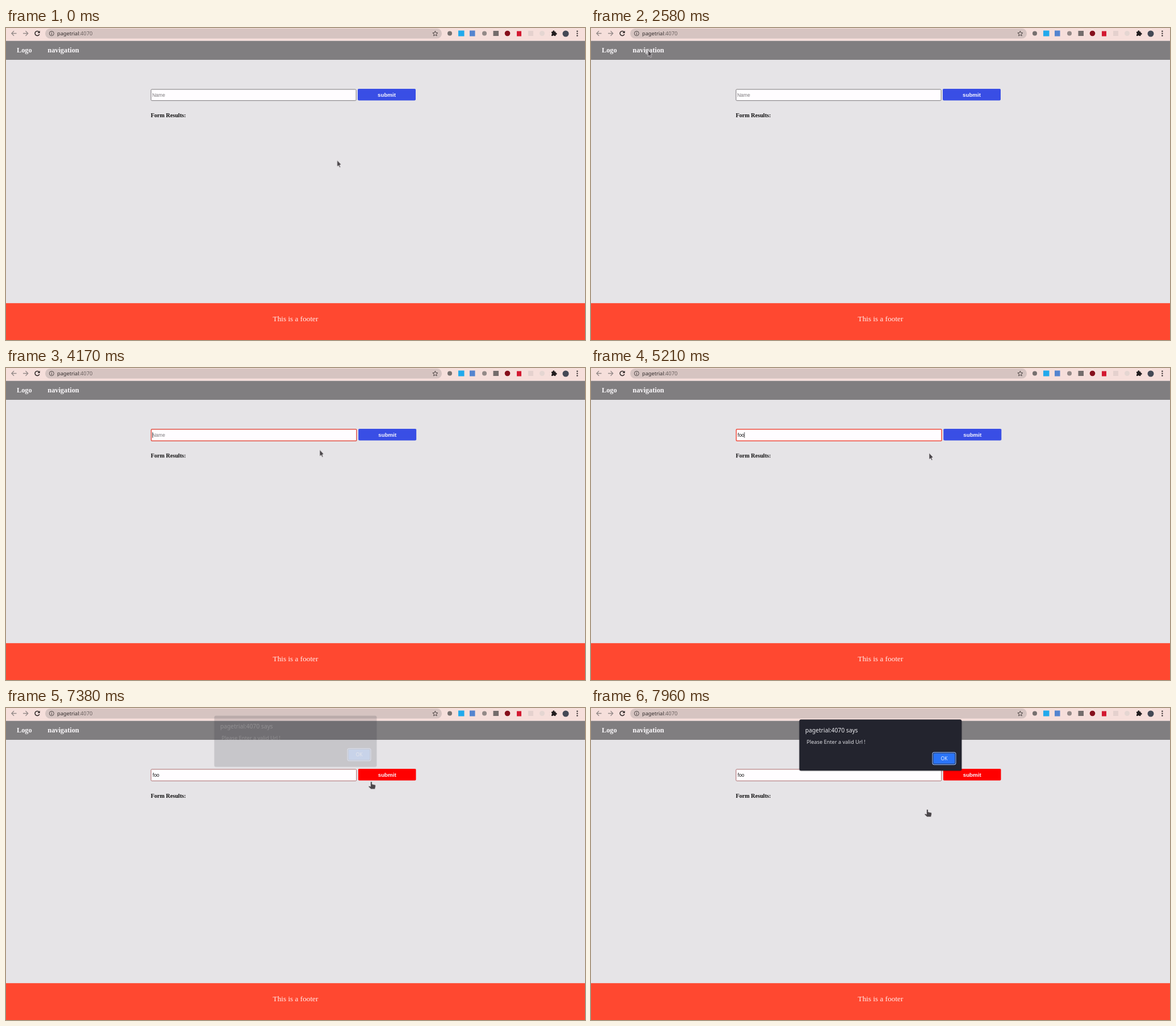
Animation of 1019x549 px, one loop 8 s. Source, as an HTML page:

```html
<!DOCTYPE html>
<html lang="en">
<head>
<meta charset="utf-8">
<title>Form validation</title>
<style>
html, body { margin: 0; width: 100%; height: 100%; overflow: hidden; background: #e6e4e7; }
svg { display: block; width: 100%; height: 100%; }
.serif { font-family: "Liberation Serif", Times, serif; }
.sans { font-family: "Liberation Sans", Arial, sans-serif; }
.ui { font-family: "Noto Sans", sans-serif; }
.bold { font-weight: 700; }
.line { fill: none; stroke: #4d4545; stroke-width: 1.3; }
.mid { text-anchor: middle; }

/* One loop is 8 s, so 1% is 80 ms. */
.field, .button, .fill, .results, .dialog, .cursor { animation: 8s linear infinite; }
.hint, .k1, .k2, .k3, .caret, .arrow, .beam, .hand { animation: 8s step-end infinite; }

.field { fill: #fffdff; animation-name: field; }
@keyframes field {
  0%, 49.5% { x: 255.2px; y: 108px; width: 361px; height: 19.7px; stroke: #7b787b; stroke-width: 1px; }
  52.5%, 90% { x: 255.6px; y: 107.8px; width: 361.5px; height: 20.5px; stroke: #ee4a3c; stroke-width: 1.5px; }
  90.9%, 100% { x: 255.2px; y: 107.9px; width: 361.6px; height: 20.3px; stroke: #a9686a; stroke-width: 1px; }
}
.button { animation-name: button; }
@keyframes button {
  0%, 49.5% { transform: translateX(0); }
  52.5%, 90% { transform: translateX(1.3px); }
  90.9%, 100% { transform: translateX(.7px); }
}
.fill { animation-name: fill; }
@keyframes fill {
  0%, 85.5% { fill: #394ee5; }
  86.5% { fill: #4548d0; }
  90.2%, 100% { fill: #f00; }
}
.results { animation-name: results; }
@keyframes results {
  0%, 49.5% { transform: translateY(0); }
  52.5%, 100% { transform: translateY(.6px); }
}

.hint { animation-name: hint; }
@keyframes hint { 0% { visibility: visible; } 61.5% { visibility: hidden; } }
.k1 { animation-name: k1; }
.k2 { animation-name: k2; }
.k3 { animation-name: k3; }
@keyframes k1 { 0% { visibility: hidden; } 61.5% { visibility: visible; } }
@keyframes k2 { 0% { visibility: hidden; } 63.5% { visibility: visible; } }
@keyframes k3 { 0% { visibility: hidden; } 65.12% { visibility: visible; } }
.caret { animation-name: caret; }
@keyframes caret {
  0% { opacity: 0; transform: none; }
  50.6% { opacity: 1; transform: none; }
  57.25% { opacity: 0; transform: none; }
  61.5% { opacity: 1; transform: translateX(2.5px); }
  63.5% { opacity: 1; transform: translateX(7.2px); }
  65.12% { opacity: 1; transform: translateX(11.8px); }
  77.62% { opacity: 0; transform: translateX(11.8px); }
  83.9% { opacity: 1; transform: translateX(11.8px); }
  90.12% { opacity: 0; transform: none; }
}

.dialog { animation-name: dialog; }
@keyframes dialog {
  0%, 91.6% { opacity: 0; transform: translateY(-7.5px); }
  92.25% { opacity: .15; transform: translateY(-6.8px); }
  94.5%, 100% { opacity: 1; transform: none; }
}

.cursor { animation-name: cursor; }
@keyframes cursor {
  0% { transform: translate(583px, 232px); }
  .5% { transform: translate(570px, 233px); }
  2.1%, 4.5% { transform: translate(390px, 234px); }
  6% { transform: translate(350px, 216px); }
  9% { transform: translate(215px, 132px); }
  12% { transform: translate(95px, 60px); }
  14.6% { transform: translate(54px, 51px); }
  16.6%, 19% { transform: translate(35px, 51px); }
  22.4%, 24.2% { transform: translate(41px, 46px); }
  26.5% { transform: translate(30px, 36px); }
  29.5% { transform: translate(85px, 34px); }
  31.5% { transform: translate(120px, 39px); }
  34.4% { transform: translate(45px, 36px); }
  35.5% { transform: translate(24px, 35px); }
  38% { transform: translate(105px, 68px); }
  41% { transform: translate(245px, 125px); }
  43.25%, 45.2% { transform: translate(298px, 143px); }
  47.4%, 49.5% { transform: translate(307px, 111px); }
  52.6%, 80.2% { transform: translate(595px, 149px); }
  83% { transform: translate(615px, 141px); }
  86.5% { transform: translate(641px, 121px); }
  90% { transform: translate(642px, 122px); }
  92.25% { transform: translate(643px, 129px); }
  95.5% { transform: translate(622px, 157px); }
  99.4%, 100% { transform: translate(592px, 178px); }
}
.pointer { fill: #4b474b; stroke: #f2f0f2; stroke-width: .7; stroke-linejoin: round; }
.arrow { animation-name: arrow; }
.beam { animation-name: beam; }
.hand { animation-name: hand; }
@keyframes arrow {
  0% { visibility: visible; }
  46.8% { visibility: hidden; }
  50.5% { visibility: visible; }
  85.3% { visibility: hidden; }
}
@keyframes beam {
  0% { visibility: hidden; }
  46.8% { visibility: visible; }
  50.5% { visibility: hidden; }
}
@keyframes hand { 0% { visibility: hidden; } 85.3% { visibility: visible; } }
</style>
</head>
<body>
<svg viewBox="0 0 1019 549" preserveAspectRatio="none">
  <rect width="1019" height="549" fill="#e6e4e7"/>

  <!-- Browser bar -->
  <rect width="1019" height="22.7" fill="#f6dfdb"/>
  <rect x="69" y="1" width="698" height="17.5" rx="8.7" fill="#d6c4c1"/>
  <path class="line" style="stroke:#948a89" d="M18.5 9.5H10M14 5.3L9.8 9.5L14 13.7M30 9.5H38.5M34.500 5.300L38.700 9.500L34.500 13.700"/>
  <path class="line" style="stroke:#2c2626;stroke-width:1.5" d="M58.200 7A4 4 0 1 0 58.800 10.800"/>
  <path d="M59.600 4.800V9H55.400Z" fill="#2c2626"/>
  <circle class="line" cx="80.300" cy="9.600" r="4" style="stroke-width:1"/>
  <path class="line" style="stroke-width:1.100" d="M80.300 9V12M80.300 7V8.100"/>
  <text class="ui" x="90" y="13" font-size="9.200" fill="#332d2d">pagetrial<tspan fill="#6c6261">:4070</tspan></text>
  <path class="line" style="stroke-width:1" d="M755.400 5.300L756.700 8.300L759.900 8.600L757.500 10.700L758.200 13.800L755.400 12.200L752.600 13.800L753.300 10.700L750.900 8.600L754.100 8.300Z"/>
  <circle cx="781" cy="9.500" r="4" fill="#77706f"/>
  <rect x="796" y="4.500" width="10.500" height="10" fill="#22a9ec"/>
  <rect x="816" y="4.500" width="9.500" height="10" fill="#5484cf"/>
  <circle cx="842" cy="9.500" r="4" fill="#938987"/>
  <rect x="857.500" y="5" width="9.500" height="9" fill="#746d6c"/>
  <circle cx="882.500" cy="9.500" r="4.800" fill="#86101b"/>
  <rect x="899" y="5.500" width="8" height="9" fill="#d31931"/>
  <rect x="919" y="5" width="9" height="9" fill="#e5d1ce"/>
  <circle cx="943.500" cy="9.500" r="4.500" fill="#e5d6d2"/>
  <path fill="#211d1e" d="M960 6.500H962.300A1.600 1.600 0 1 1 965.300 6.500H967.500V8.700A1.600 1.600 0 1 1 967.500 11.700V14H965A1.500 1.500 0 0 0 962.200 14H960V11.600A1.500 1.500 0 0 0 960 8.800Z"/>
  <circle cx="985" cy="10" r="5.500" fill="#444955"/>
  <g fill="#373031">
    <circle cx="1005.400" cy="5.700" r="1.200"/>
    <circle cx="1005.400" cy="9.600" r="1.200"/>
    <circle cx="1005.400" cy="13.500" r="1.200"/>
  </g>

  <!-- Page -->
  <rect y="22.700" width="1019" height="33.300" fill="#807e80"/>
  <g class="serif bold" font-size="12.300" fill="#fbf9fb">
    <text x="19" y="43.300">Logo</text>
    <text x="73.300" y="43.300">navigation</text>
  </g>
  <rect y="484.200" width="1019" height="65" fill="#ff4830"/>
  <text class="serif mid" x="509.500" y="516.300" font-size="13.250" fill="#fff0ee">This is a footer</text>

  <rect class="field" rx="1.500"/>
  <g class="sans" font-size="8.500">
    <text class="hint" x="257.200" y="121" fill="#7b787b">Name</text>
    <text x="258" y="121" fill="#111"><tspan class="k1">f</tspan><tspan class="k2">o</tspan><tspan class="k3">o</tspan></text>
  </g>
  <rect class="caret" x="257.700" y="113" width=".8" height="10" fill="#111"/>
  <g class="button">
    <rect class="fill" x="619" y="107" width="102" height="20.400" rx="1.800"/>
    <text class="sans bold mid" x="670" y="121" font-size="9.750" fill="#f8f7ff">submit</text>
  </g>
  <text class="serif bold results" x="254.700" y="157.400" font-size="10.200" fill="#0d0c0d">Form Results:</text>

  <!-- Alert -->
  <g class="dialog ui">
    <rect x="365.800" y="20.500" width="287.400" height="91" rx="4" fill="#000" opacity=".18"/>
    <rect x="366.700" y="20.200" width="285.600" height="90" rx="3" fill="#23242e"/>
    <text x="377" y="43" font-size="10.250" fill="#eeeef2">pagetrial:4070 says</text>
    <text x="379.500" y="63" font-size="9.180" fill="#e0e0e5">Please Enter a valid Url !</text>
    <rect x="601" y="78.200" width="41" height="21.400" rx="3" fill="#23242e" stroke="#83acf4" stroke-width="1.200"/>
    <rect x="602.500" y="79.600" width="38" height="18.600" rx="2" fill="#2a74f8"/>
    <text class="mid" x="621.600" y="92" font-size="8.300" fill="#e9f0ff">OK</text>
  </g>

  <g class="cursor">
    <path class="pointer arrow" d="M0 .5V12L2.600 9.900L4.400 13.600L6.200 12.700L4.500 9.200L7.300 8.200Z"/>
    <path class="beam line" d="M-2 1H2M0 1V15M-2 15H2"/>
    <path class="pointer hand" d="M-1.500 1Q0 -.5 1.400 1V4.800L6.500 6Q8 6.500 7.700 8.300L6.500 13.700H-.500L-5 9.500Q-5.300 7.800 -3.500 8L-1.500 9Z"/>
  </g>
</svg>
</body>
</html>
```
